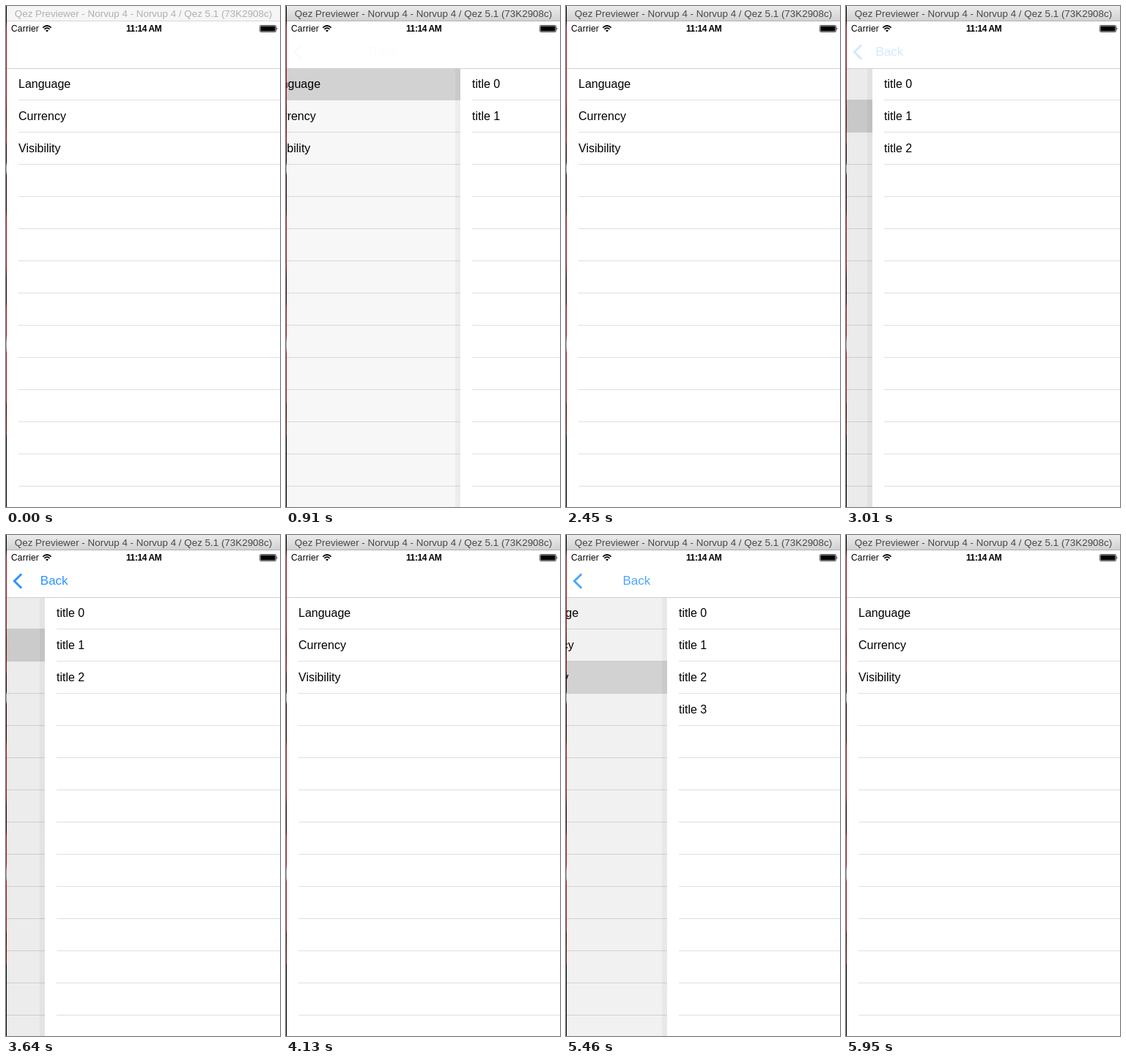
These frames come from a looping animation (374x685 px, 6440 ms). An HTML page:

```html
<!DOCTYPE html>
<html lang="en">
<head>
<meta charset="utf-8">
<title>Settings list navigation</title>
<style>
  html, body { margin: 0; width: 100%; height: 100%; overflow: hidden; background: #fff; }
  body { position: relative; font: 16px "Liberation Sans", Arial, sans-serif; color: #000; }
  div, span, svg { position: absolute; white-space: nowrap; }
  #desk {
    left: 0; top: 0; width: 1px; height: 100%;
    background: linear-gradient(#000 20px, #a01414 30px 125px, #4a0808 150px, #a01414 185px, #200 190px 214px,
      #999 218px 226px, #200 232px 280px, #a01414 290px 355px, #200 372px 405px, #a01414 412px 450px,
      #999 460px 468px, #a01414 475px 540px, #300 545px, #700c0c 585px, #000 588px);
  }
  #title {
    left: 1px; right: 0; top: 0; height: 20px; border-bottom: 1px solid #b4b4b4; border-radius: 4px 0 0 0;
    background: linear-gradient(#ebebeb, #d2d2d2); color: #484848;
    font-size: 13.4px; line-height: 21px; text-align: center;
  }
  #title.idle { background: #f6f6f6; color: #b0b0b0; border-color: #d6d6d6; }
  #bar { left: 1px; right: 0; top: 21px; height: 64px; background: #fff; border-bottom: 1px solid #cfcfcf; }
  .status { top: 0; font-size: 12px; line-height: 21px; }
  #screen { left: 1px; right: 0; top: 85px; bottom: 0; overflow: hidden; }
  .page { left: 0; top: 0; width: 374px; height: 100%; background: #fff; }
  .lines {
    left: 16px; right: 0; top: 0; bottom: 0;
    background: repeating-linear-gradient(transparent 0 43px, #dfdfdf 43px 44px);
  }
  .row { left: 16px; line-height: 43px; }
  #mark { left: 0; width: 100%; height: 45px; background: #d9d9d9; }
  #dim { inset: 0; background: #000; }
  #shade { left: -7px; width: 7px; top: 0; bottom: 0; background: rgba(0, 0, 0, .04); }
  #back, #arrow { color: #0a84ff; }
  #back { left: 27px; top: 32px; font-size: 17px; line-height: 20px; }
</style>
</head>
<body>
<div id="desk"></div>
<div id="screen">
  <div class="page" id="menu"><div class="lines"></div><div id="mark"></div></div>
  <div id="dim"></div>
  <div class="page" id="detail"><div id="shade"></div><div class="lines"></div></div>
</div>
<div id="bar">
  <span class="status" style="left:6px;letter-spacing:.2px">Carrier</span>
  <span class="status" style="left:163px;font-weight:bold;letter-spacing:-.4px">11:14 AM</span>
  <svg style="left:48px;top:4px" width="14" height="12" fill="none" stroke="#000" stroke-width="1.7">
    <path d="M1.3 4.6Q7-.6 12.7 4.6M3.4 6.8Q7 3.6 10.6 6.8"/>
    <path d="M7 10.6L5 8.6Q7 7 9 8.6Z" fill="#000" stroke="none"/>
  </svg>
  <svg style="left:345px;top:5px" width="26" height="12">
    <rect x=".5" y=".5" width="22" height="9" rx="1.5" fill="none" stroke="#555"/>
    <rect x="1.5" y="1.5" width="20" height="7" rx=".5"/>
    <path d="M23.5 3.2Q25.4 5 23.5 6.8Z"/>
  </svg>
  <svg id="arrow" style="left:7px;top:30px" width="16" height="24" fill="none" stroke="currentColor" stroke-width="3">
    <path d="M13.2 2.2L3.4 12L13.2 21.8"/>
  </svg>
  <span id="back">Back</span>
</div>
<div id="title">Qez Previewer - Norvup 4 - Norvup 4 / Qez 5.1 (73K2908c)</div>
<script>
  const LOOP = 6440, TICK = 70, SLIDE = 510, WIDTH = 374;
  // Each visit opens one menu row, then returns.
  const visits = [
    { push: 832, pop: 1882 },
    { push: 2793, pop: 3605 },
    { push: 4374, pop: 5382 }
  ];
  const $ = id => document.getElementById(id);
  const clamp = v => Math.min(1, Math.max(0, v));

  function addRow(page, text, i) {
    const row = document.createElement('div');
    row.className = 'row';
    row.style.top = 44 * i + 'px';
    row.textContent = text;
    page.append(row);
    return row;
  }
  ['Language', 'Currency', 'Visibility'].forEach((text, i) => addRow($('menu'), text, i));
  const titles = [0, 1, 2, 3].map(i => addRow($('detail'), 'title ' + i, i));

  // Cubic bezier (.36, .66, .04, 1), solved by bisection.
  function ease(x) {
    if (x <= 0 || x >= 1) return clamp(x);
    const at = (s, a, b) => 3 * a * s * (1 - s) ** 2 + 3 * b * s * s * (1 - s) + s ** 3;
    let lo = 0, hi = 1;
    for (let i = 0; i < 24; i++) {
      const mid = (lo + hi) / 2;
      if (at(mid, .36, .04) < x) lo = mid; else hi = mid;
    }
    return at(lo, .66, 1);
  }

  function draw(t) {
    const index = visits.findLastIndex(v => t >= v.push);
    const visit = visits[Math.max(0, index)];
    const inT = clamp((t - visit.push) / SLIDE);
    const outT = clamp((t - visit.pop) / SLIDE);
    const open = ease(inT) - ease(outT);
    const shown = inT - outT;
    const x = WIDTH * (1 - open);

    $('title').classList.toggle('idle', t < 840);
    $('menu').style.transform = `translateX(${-.3 * WIDTH * open}px)`;
    $('dim').style.opacity = .085 * open;
    $('detail').style.transform = `translateX(${Math.round(x)}px)`;
    $('detail').style.visibility = shown > 0 ? 'visible' : 'hidden';
    $('shade').style.opacity = shown < 1 ? 1 : 0;
    $('mark').style.top = 44 * Math.max(0, index) - 1 + 'px';
    $('mark').style.opacity = inT > 0 ? 1 - outT : 0;
    titles.forEach((row, i) => row.style.display = i < index + 2 ? '' : 'none');
    $('back').style.transform = `translateX(${135 * (1 - open)}px)`;
    $('back').style.opacity = $('arrow').style.opacity = shown ** 2;
  }

  const start = performance.now();
  function frame() {
    const t = (performance.now() - start) % LOOP;
    draw(Math.floor(t / TICK) * TICK);
    requestAnimationFrame(frame);
  }
  frame();
</script>
</body>
</html>
```
